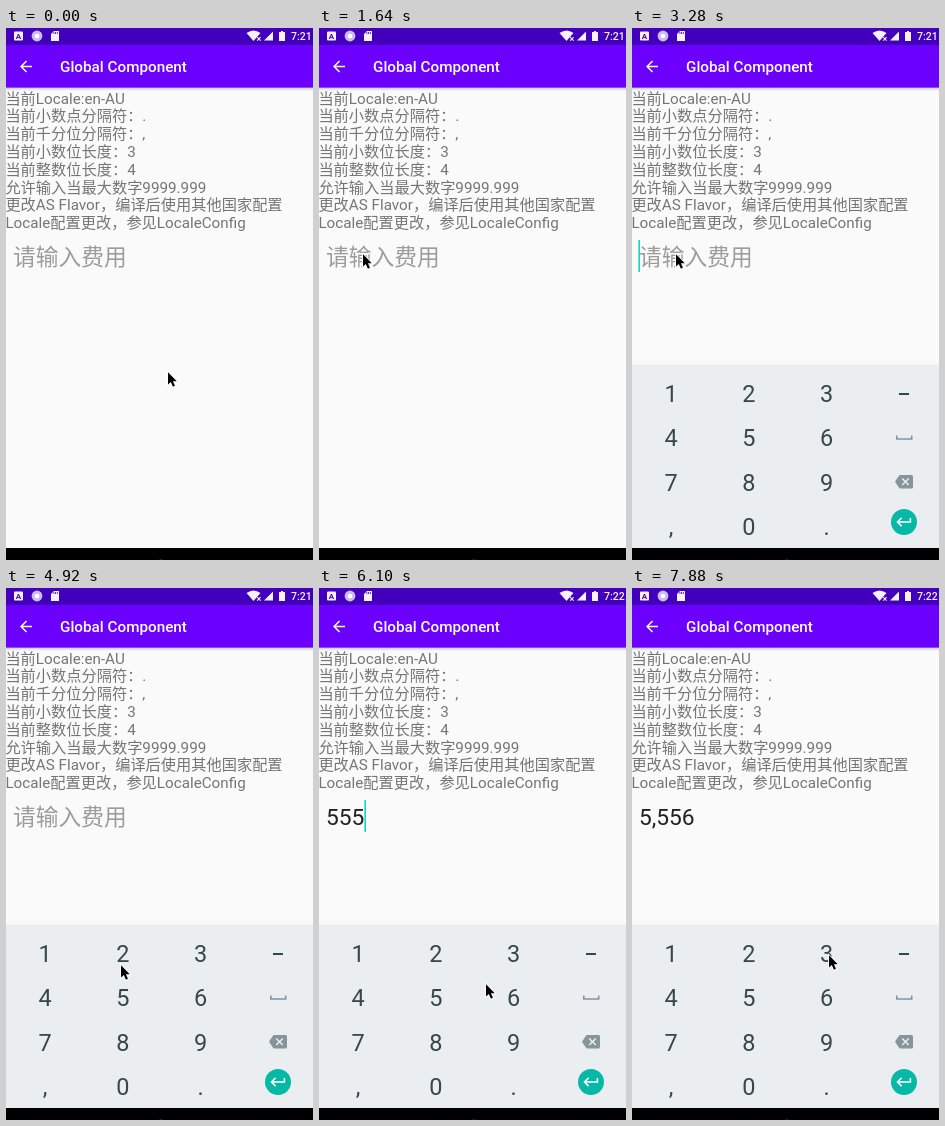
An HTML page with a canvas for the animation above (8000 ms loop, 307x532 px).

```html
<!DOCTYPE html>
<html lang="zh-CN">
<head>
<meta charset="utf-8">
<title>Global Component</title>
<style>
html, body { margin: 0; width: 100%; height: 100%; overflow: hidden; background: #fafafa; }
canvas { display: block; width: 307px; height: 532px; }
</style>
</head>
<body>
<canvas id="stage"></canvas>
<script>
const W = 307, H = 532, LOOP = 8000, TICK = 148.7;
const FONT = 'Roboto, "Noto Sans CJK SC", "Noto Sans CJK", sans-serif';
const canvas = document.getElementById('stage');
const dpr = window.devicePixelRatio || 1;
canvas.width = W * dpr;
canvas.height = H * dpr;
const ctx = canvas.getContext('2d');

const INFO = [
  '当前Locale:en-AU',
  '当前小数点分隔符：.',
  '当前千分位分隔符：,',
  '当前小数位长度：3',
  '当前整数位长度：4',
  '允许输入当最大数字9999.999',
  '更改AS Flavor，编译后使用其他国家配置',
  'Locale配置更改，参见LocaleConfig'
];

const ICON = {
  back: 'M20 11H7.83l5.59-5.59L12 4l-8 8 8 8 1.41-1.41L7.83 13H20z',
  erase: 'M22 3H7c-.69 0-1.23.35-1.59.88L0 12l5.41 8.11c.36.53.9.89 1.59.89h15c1.1 0 2-.9 2-2V5c0-1.1-.9-2-2-2z' +
    'm-3 12.59L17.59 17 14 13.41 10.41 17 9 15.59 12.59 12 9 8.41 10.41 7 14 10.59 17.59 7 19 8.41 15.41 12z',
  enter: 'M19 7v4H5.83l3.58-3.59L8 6l-6 6 6 6 1.41-1.41L5.83 13H21V7z',
  wifi: 'M0 2Q7-3 14 2L7 10z',
  signal: 'M0 9H9V0z',
  battery: 'M0 1H2V0H4V1H6V10H0z',
  card: 'M3 0H8V10H0V3z',
  pointer: 'M0 0V14L3.2 11.1 5.6 16.4 7.9 15.4 5.6 10.2H10z'
};
for (const name in ICON) ICON[name] = new Path2D(ICON[name]);

// Pointer stops: tick, x, y
const POINTER = [
  [0, 161, 343], [8, 43, 225], [30, 43, 225], [31, 62, 272], [32, 96, 345],
  [33, 114, 376], [35, 119, 406], [39, 119, 405], [41, 166, 395], [43, 188, 404],
  [46, 189, 406], [47, 194, 402], [48, 194, 402], [50, 198, 390], [53, 196, 366]
];

// Typed value from a given tick on
const TYPED = [[46, '5,556'], [39, '555'], [37, '55'], [36, '5'], [0, '']];

// Tick ranges in which the caret shows
const CARET = [[8, 10], [15, 18], [22, 25], [28, 31], [36, 43], [46, 50]];

const within = (k, [a, b]) => k >= a && k < b;

function rect(x, y, w, h, color) {
  ctx.fillStyle = color;
  ctx.fillRect(x, y, w, h);
}

function disc(x, y, r, color) {
  ctx.fillStyle = color;
  ctx.beginPath();
  ctx.arc(x, y, r, 0, 7);
  ctx.fill();
}

function text(str, x, y, size, color, weight = 400, align = 'left') {
  ctx.font = `${weight} ${size}px ${FONT}`;
  ctx.textAlign = align;
  ctx.fillStyle = color;
  ctx.fillText(str, x, Math.round(y));
}

function icon(path, x, y, scale, color, outline) {
  ctx.save();
  ctx.translate(x, y);
  ctx.scale(scale, scale);
  if (outline) {
    ctx.strokeStyle = outline;
    ctx.lineWidth = 2;
    ctx.stroke(path);
  }
  ctx.fillStyle = color;
  ctx.fill(path);
  ctx.restore();
}

function drawStatusBar(k) {
  const bar = '#4300bc', light = '#f4f0fc';
  rect(0, 0, W, 17, bar);
  ctx.fillStyle = light;
  ctx.beginPath();
  ctx.roundRect(8, 3.5, 9, 9, 1);
  ctx.fill();
  text('A', 12.5, 11, 8, bar, 700, 'center');
  disc(31, 8, 5.4, '#cdbcf0');
  disc(31, 8, 2.3, '#fff');
  icon(ICON.card, 45, 3, 1, light);
  for (let i = 0; i < 3; i++) rect(47.5 + i * 1.7, 4, .8, 2, bar);
  icon(ICON.wifi, 240.5, 3, 1, light);
  text('×', 253, 14, 9, light, 700, 'center');
  icon(ICON.signal, 258, 3.5, 1, light);
  icon(ICON.battery, 273, 3, 1, light);
  text(k < 36 ? '7:21' : '7:22', 285, 12, 10.5, light, 500);
}

function drawAppBar() {
  const shade = ctx.createLinearGradient(0, 59, 0, 63);
  shade.addColorStop(0, 'rgba(0,0,0,.22)');
  shade.addColorStop(1, 'rgba(0,0,0,0)');
  rect(0, 59, W, 4, shade);
  rect(0, 17, W, 42.6, '#6c00fe');
  icon(ICON.back, 11, 29.5, .75, '#fff');
  text('Global Component', 54, 44, 15.25, '#fff', 500);
}

function drawField(k) {
  const value = TYPED.find(([from]) => k >= from)[1];
  text(value || '请输入费用', 7, 237, 22.75, value ? '#212121' : '#9c9c9c');
  if (CARET.some(range => within(k, range))) {
    const w = value ? ctx.measureText(value).width + .6 : 0;
    rect(Math.round(6 + w) + .4, 212, 1.6, 32, '#16d3c2');
  }
}

function drawKeyboard(k) {
  if (k < 12) return;
  const ink = '#37474f', soft = '#86949b';
  ctx.save();
  ctx.beginPath();
  ctx.rect(0, 0, W, 520);
  ctx.clip();
  ctx.translate(0, k < 13 ? 60 : 0);
  rect(0, 336.6, W, 184, '#eaeef1');
  if (k === 45) rect(156, 388, 77, 43, '#d3dade');
  ['123', '456', '789', ',0.'].forEach((row, r) =>
    [...row].forEach((key, c) =>
      text(key, 39.1 + c * 77.7, 374 + r * 44.3, 23.5, ink, 400, 'center')));
  rect(267, 365, 10, 2, ink);
  ctx.strokeStyle = soft;
  ctx.lineWidth = 1.6;
  ctx.beginPath();
  ctx.moveTo(264.8, 407.5);
  ctx.lineTo(264.8, 411);
  ctx.lineTo(279.7, 411);
  ctx.lineTo(279.7, 407.5);
  ctx.stroke();
  icon(ICON.erase, 263, 444.7, .75, soft);
  disc(272, 494, 13, '#06b9a7');
  icon(ICON.enter, 262.8, 484.6, .78, '#fff');
  ctx.restore();
}

function pointerAt(k) {
  const i = Math.max(1, POINTER.findIndex(p => p[0] >= k));
  const [k0, x0, y0] = POINTER[i - 1], [k1, x1, y1] = POINTER[i];
  let u = (k - k0) / (k1 - k0);
  if (i === 1) u = u * u * (3 - 2 * u);
  return [x0 + (x1 - x0) * u, y0 + (y1 - y0) * u];
}

function draw(t) {
  const k = Math.min(53, Math.floor((t + 6) / TICK));
  ctx.setTransform(dpr, 0, 0, dpr, 0, 0);
  rect(0, 0, W, H, '#fafafa');
  drawStatusBar(k);
  drawAppBar();
  INFO.forEach((line, i) => text(line, -.6, 75.6 + i * 17.8, 15.22, '#757575'));
  drawField(k);
  drawKeyboard(k);
  rect(0, 520, W, 12, '#000');
  disc(155, 538, 6.6, '#444');
  const [x, y] = pointerAt(k);
  icon(ICON.pointer, x + 1, y + 1.3, .88, '#000', '#fff');
}

const start = performance.now();
function tick() {
  draw((performance.now() - start) % LOOP);
  requestAnimationFrame(tick);
}
tick();
</script>
</body>
</html>
```
